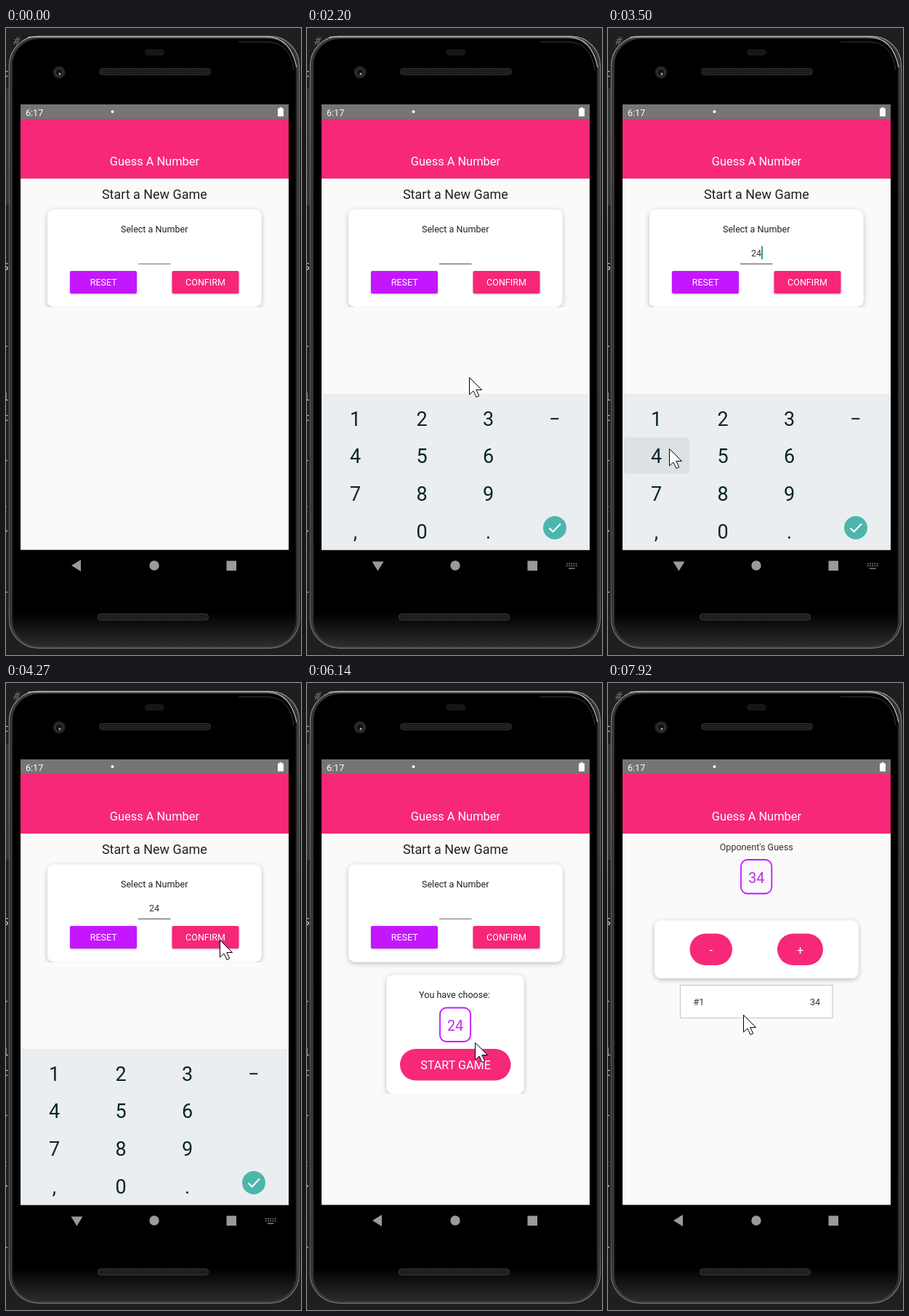
An HTML page for the animation above (8 s loop, 406 px wide and 862 px high).

```html
<!DOCTYPE html>
<html lang="en">
<head>
<meta charset="utf-8">
<title>Guess A Number</title>
<style>
html, body { margin: 0; width: 100%; height: 100%; overflow: hidden; background: #1e1e1e; }
svg { display: block; width: 100%; height: 100%; }
text { font-family: Roboto, sans-serif; font-size: 12.57px; fill: #212121; }
.mid { text-anchor: middle; }
.white { fill: #fff; }
.h { font-size: 17.96px; }
.btn { font-size: 16.16px; fill: #fff; }
.num { font-size: 19.8px; fill: #c22be6; }
.key { font-size: 27px; fill: #07242b; }
.code { font: 15px "Noto Sans Mono", monospace; fill: #d4d4d4; }
.pink { fill: #f72878; }
.nav { fill: #9a9a9a; }
</style>
</head>
<body>
<svg viewBox="0 0 406 862">
  <defs>
    <linearGradient id="rim" x2="0" y2="1">
      <stop offset="0" stop-color="#8c8c8c"/><stop offset=".06" stop-color="#777"/>
      <stop offset=".3" stop-color="#5c5c5c"/><stop offset=".9" stop-color="#555"/>
      <stop offset="1" stop-color="#777"/>
    </linearGradient>
    <linearGradient id="chin" x2="0" y2="1">
      <stop offset=".945" stop-color="#000"/><stop offset="1" stop-color="#2c2c2c"/>
    </linearGradient>
    <pattern id="mesh" width="3" height="3" patternUnits="userSpaceOnUse">
      <rect width="3" height="3" fill="#1a1a1a"/><circle cx="1.5" cy="1.5" r=".8" fill="#303030"/>
    </pattern>
    <filter id="lift" x="-10%" y="-20%" width="120%" height="140%">
      <feDropShadow dx="0" dy="2" stdDeviation="3.5" flood-opacity=".25"/>
    </filter>
    <filter id="low" x="-10%" y="-20%" width="120%" height="150%">
      <feDropShadow dx="0" dy="1" stdDeviation="1" flood-opacity=".3"/>
    </filter>
    <clipPath id="screen"><rect x="20" y="105" width="369" height="612.500"/></clipPath>
    <clipPath id="form"><rect id="formClip" x="20" y="207" width="369" height="177"/></clipPath>
    <clipPath id="pick"><rect x="20" y="384" width="369" height="181"/></clipPath>
  </defs>

  <rect width="406" height="862" fill="#1f1f1f"/>
  <rect y="83" width="4" height="160" fill="#353535"/>
  <g id="code">
    <text class="code" x="9" y="23" style="fill:#777;font-style:italic">#</text>
  </g>

  <rect x="4.500" y="11.500" width="399" height="841" rx="40" fill="#1c1c1c" stroke="url(#rim)" stroke-width="1.500"/>
  <rect x="7" y="13.500" width="394" height="837" rx="38" fill="none" stroke="#3c3c3c" stroke-width="2"/>
  <rect x="9.500" y="15" width="389" height="835" rx="36" fill="url(#chin)"/>
  <path d="M30 13Q36 12 50 12H358Q392 13 400 54" fill="none" stroke="#b4b4b4" stroke-width="1.300"/>
  <path d="M320 19H360Q391 20 396 58" fill="none" stroke="#3a3a3a"/>
  <rect x="191" y="29" width="27" height="9" rx="4.5" fill="#161616"/>
  <circle cx="73" cy="61" r="8.5" fill="#232323"/>
  <circle cx="73" cy="61" r="5" fill="#111" stroke="#444"/>
  <circle cx="74" cy="63" r="1.5" fill="#aaa"/>
  <rect x="128.500" y="55.500" width="153" height="9" rx="4" fill="url(#mesh)" stroke="#2c2c2c"/>
  <rect x="126.500" y="805.500" width="152" height="8.500" rx="4" fill="url(#mesh)" stroke="#3c3c3c"/>

  <g clip-path="url(#screen)">
    <rect x="20" y="105" width="369" height="613" fill="#fafafa"/>
    <rect x="20" y="105" width="369" height="21" fill="#757575"/>
    <rect class="pink" x="20" y="125" width="369" height="82"/>
    <text class="white" x="27" y="120.500" style="font-size:12.57px">6:17</text>
    <circle class="white" cx="146.500" cy="115" r="2"/>
    <path class="white" d="M374 110.500H376.500V109H379.500V110.500H382V121.500H374Z"/>
    <text class="mid white" x="204.400" y="189" style="font-size:16.4px">Guess A Number</text>

    <g id="start">
      <text class="mid h" x="204.300" y="235">Start a New Game</text>
      <g clip-path="url(#form)">
        <rect class="white" x="57" y="249.500" width="294.500" height="134" rx="9" filter="url(#lift)"/>
      </g>
      <text class="mid" x="204.200" y="281">Select a Number</text>
      <text class="mid" id="entry" x="204" y="314" style="fill:#333"></text>
      <path id="line" d="M182 324.300H226.500" stroke="#6f6670"/>
      <rect id="caret" y="300" width="1.600" height="18" fill="#008577"/>
      <rect x="88" y="334" width="92" height="31" rx="2" fill="#c416ff" filter="url(#low)"/>
      <rect class="pink" x="228.500" y="334" width="92" height="31" rx="2" filter="url(#low)"/>
      <rect class="white" id="flash" x="228.500" y="334" width="92" height="31" rx="2"/>
      <text class="mid white" x="134.200" y="354">RESET</text>
      <text class="mid white" x="274.500" y="354">CONFIRM</text>
      <g id="chosen">
        <g clip-path="url(#pick)">
          <rect class="white" x="109.500" y="401.500" width="189" height="163.500" rx="9" filter="url(#lift)"/>
        </g>
        <text class="mid" x="203" y="433">You have choose:</text>
        <rect x="183" y="446.500" width="42" height="46.500" rx="9" fill="none" stroke="#c416ff" stroke-width="1.800"/>
        <text class="mid num" x="204" y="478">24</text>
        <g id="go">
          <rect class="pink" x="128" y="503" width="152.500" height="43.500" rx="21.750"/>
          <text class="mid btn" x="204.500" y="531">START GAME</text>
        </g>
      </g>
    </g>

    <g id="game">
      <text class="mid" x="204.200" y="229.500" style="fill:#333">Opponent's Guess</text>
      <rect x="183" y="243" width="42.300" height="46.500" rx="9" fill="none" stroke="#c416ff" stroke-width="1.800"/>
      <text class="mid num" x="204.300" y="274.500">34</text>
      <rect class="white" x="64" y="326.500" width="280.500" height="79.500" rx="9" filter="url(#lift)"/>
      <rect class="pink" x="112.500" y="344.500" width="58.500" height="43.500" rx="21.750"/>
      <rect class="pink" x="233" y="344.500" width="63" height="43.500" rx="21.750"/>
      <text class="mid btn" x="141.800" y="372.500">-</text>
      <text class="mid btn" x="264.500" y="372.500">+</text>
      <rect x="99.500" y="415.500" width="209.500" height="45" fill="#fff" stroke="#ccc" stroke-width="1.300"/>
      <text x="117.500" y="443" style="fill:#333">#1</text>
      <text x="292" y="443" text-anchor="end" style="fill:#333">34</text>
    </g>

    <g id="keys">
      <rect x="20" y="503" width="369" height="215" fill="#ebeef1"/>
      <rect id="press" width="90" height="50" rx="4" fill="#cfd5d9"/>
      <circle cx="341" cy="687" r="16" fill="#4db6ac"/>
      <path d="M333.500 687.500L338.500 692.500L349 681.500" fill="none" stroke="#fff" stroke-width="2"/>
    </g>
  </g>

  <path class="nav" id="back" d="M90 739L103 731V747Z"/>
  <circle class="nav" cx="204" cy="739" r="6.700"/>
  <rect class="nav" x="303.500" y="732.500" width="13.500" height="13.500"/>
  <g id="kbIcon" stroke="#8c8c8c" stroke-width="1.400" fill="none">
    <path d="M357 736.500H371.500M357 739.500H371.500" stroke-dasharray="1.700 1.500"/>
    <path d="M360 743H368.500"/>
  </g>
  <path id="cursor" d="M0 0V23.500L5.500 18.500L9.500 27L13.300 25.300L9.300 17H17Z" fill="#fff" stroke="#000"/>
</svg>
<script>
const LOOP = 8000, STEP = 77, LEAD = 110;
const el = id => document.getElementById(id);
const set = (id, name, value) => el(id).setAttribute(name, value);
const show = (id, on) => set(id, 'visibility', on ? 'inherit' : 'hidden');
const clamp = v => Math.max(0, Math.min(1, v));
const ease = v => 1 - (1 - clamp(v)) ** 2;

function addText(parent, cls, x, y, str) {
  const t = document.createElementNS('http://www.w3.org/2000/svg', 'text');
  t.setAttribute('class', cls);
  t.setAttribute('x', x);
  t.setAttribute('y', y);
  t.textContent = str;
  el(parent).append(t);
}

['123−', '456', '789', ',0.'].forEach((row, r) =>
  [...row].forEach((c, i) => addText('keys', 'mid key', 66.5 + 91.5 * i, 546.5 + 51.8 * r, c)));

// Slivers of an editor window beside the phone
[['c', 67], ['S', 333], ['-', 442], ['l', 512], ['c', 540], ['-', 599], [':', 665], ['}', 695], ['-', 780]]
  .forEach(([c, y]) => addText('code', 'code', -5, y, c));

// Pointer path: step, x, y
const path = [
  [0, 290, 775], [3, 252, 600], [6, 192, 372], [8, 169, 278], [10, 180, 294], [12, 198, 302],
  [16, 198, 302], [17, 198, 312], [20, 198, 312], [27, 223, 480], [31, 172, 536], [35, 172, 536],
  [38, 168, 564], [41, 84, 578], [45, 84, 578], [49, 308, 357], [50, 308, 357], [53, 294, 353],
  [65, 294, 353], [67, 280, 347], [77, 280, 347], [78, 231, 494], [85, 219, 526], [99, 219, 526],
  [101, 186, 456]
];

function pointer(s) {
  const i = path.findIndex(p => p[0] >= s);
  if (i < 0) return path[path.length - 1].slice(1);
  if (i === 0) return path[0].slice(1);
  const [s0, x0, y0] = path[i - 1], [s1, x1, y1] = path[i];
  const k = (s - s0) / (s1 - s0);
  return [x0 + (x1 - x0) * k, y0 + (y1 - y0) * k];
}

function draw(time) {
  const s = Math.floor((time - LEAD) / STEP);
  const inGame = s >= 93, picked = s >= 70 && !inGame;

  // Half a pixel keeps the outline crisp
  const [px, py] = pointer(s).map(v => Math.round(v) + 0.5);
  show('cursor', time >= 120);
  set('cursor', 'transform', `translate(${px} ${py})`);

  show('start', !inGame);
  show('game', inGame);
  show('chosen', picked);
  set('go', 'opacity', s === 92 ? 0.4 : 1);
  set('formClip', 'height', picked ? 220 : 177);
  set('flash', 'opacity', s >= 69 && s < 74 ? 0.3 * (74 - s) / 5 : 0);

  const entry = picked || s < 33 ? '' : s < 43 ? '2' : '24';
  el('entry').textContent = entry;
  const focused = s >= 17 && s < 58;
  const since = s - (s < 33 ? 17 : s < 43 ? 33 : 43);
  show('caret', focused && !inGame && since % 13 < 7 && s < 50);
  set('caret', 'x', 204 + entry.length * 3.6);
  set('line', 'stroke', focused ? '#4a3c4c' : '#6f6670');

  const up = ease((s - 18) / 5) * (1 - ease((s - 57) / 5));
  show('keys', up > 0);
  set('keys', 'transform', `translate(0 ${215 * (1 - up)})`);
  const hit = s < 38 ? 32 : 42;
  set('press', 'x', s < 38 ? 113 : 22);
  set('press', 'y', s < 38 ? 512 : 563);
  set('press', 'opacity', s >= hit ? clamp(1 - (s - hit) / 4) : 0);

  const turn = 90 * clamp((s - 16.5) / 4) * (1 - clamp((s - 57) / 4));
  set('back', 'transform', `rotate(${-turn} 97.5 739)`);
  show('kbIcon', s >= 17 && s < 60);
}

function tick() {
  draw(performance.now() % LOOP);
  requestAnimationFrame(tick);
}
tick();
</script>
</body>
</html>
```
